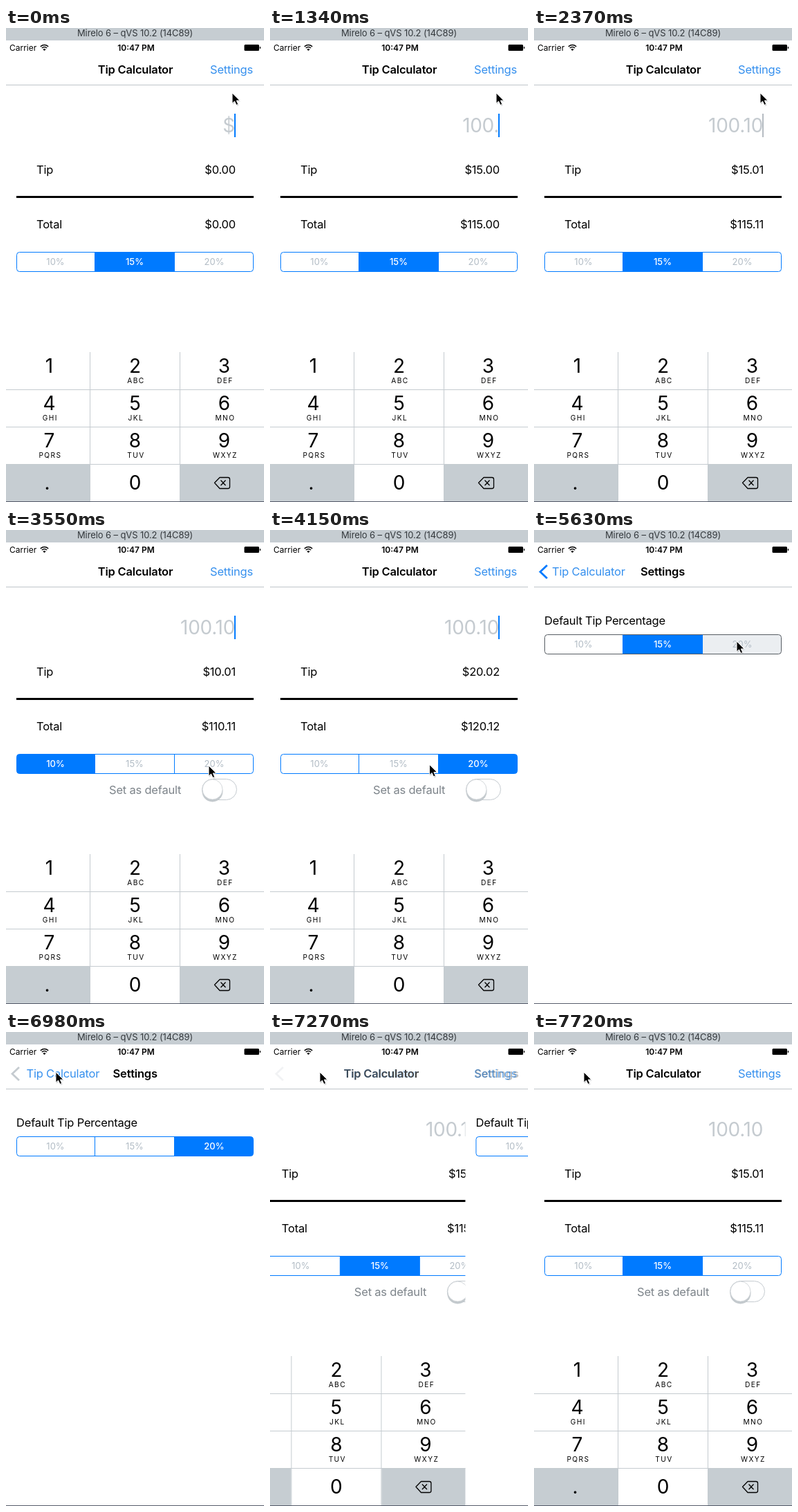
An HTML page that plays this animation: 373x686 px, repeating every 8000 ms.

```html
<!DOCTYPE html>
<html lang="en">
<head>
<meta charset="utf-8">
<title>Tip Calculator</title>
<style>
html, body { margin: 0; width: 100%; height: 100%; overflow: hidden; background: #fff; }
svg { display: block; width: 100vw; height: 100vh; font-family: Inter, Roboto, sans-serif; }
text { white-space: pre; }
</style>
</head>
<body>
<svg id="stage" viewBox="0 0 373 686"></svg>
<script>
const W = 373, LOOP = 8000, STEP = 148.6, FIRST = 280;
const BLUE = '#007aff', LINK = '#3690ee', GREY = '#c5cbd0', BAR = '#c6cdd2';
const stage = document.getElementById('stage');

const clamp = v => Math.max(0, Math.min(1, v));
const ramp = (t, a, b) => clamp((t - a) / (b - a));
const easeOut = v => 1 - (1 - v) ** 2;
const easeBoth = v => v * v * (3 - 2 * v);

// Value of the last entry [time, value] already reached.
const at = (list, t) => list.filter(e => e[0] <= t).pop()[1];

const hold = t => t < FIRST ? 0 : FIRST + Math.floor((t - FIRST) / STEP) * STEP;

const typed = [[0, ''], [270, '1'], [570, '10'], [720, '100'],
  [1310, '100.'], [1460, '100.1'], [1610, '100.10']];
const chosen = [[0, 1], [2940, 0], [3690, 2], [4430, 1]];
const caretTone = [[0, BLUE], [1760, '#b5bcc2'], [2500, 'none'], [2940, BLUE],
  [4430, 'none']];
const path = [[0, 327, 94], [2361, 327, 94], [2807, 75, 338], [3104, 75, 338],
  [3400, 293, 341], [3996, 293, 341], [4293, 167, 338], [4590, 167, 338],
  [4887, 325, 62], [5332, 325, 62], [5480, 293, 161], [6076, 293, 161],
  [6372, 72, 58], [LOOP, 72, 58]];

function pointer(t) {
  const i = Math.max(1, path.findIndex(p => p[0] >= t));
  const [a, x, y] = path[i - 1], [b, u, v] = path[i];
  const k = easeBoth(ramp(t, a, b));
  return [x + (u - x) * k, y + (v - y) * k];
}

function text(s, x, y, o = {}) {
  const { size = 16.5, fill = '#000', anchor = 'start', weight = 400, track = -0.2, alpha = 1 } = o;
  return `<text x="${x}" y="${y}" font-size="${size}" fill="${fill}" text-anchor="${anchor}" ` +
    `font-weight="${weight}" letter-spacing="${track}" opacity="${alpha}">${s}</text>`;
}
const mid = (s, x, y, o) => text(s, x, y, { anchor: 'middle', ...o });
const right = (s, x, y, o) => text(s, x, y, { anchor: 'end', ...o });
const rect = (x, y, w, h, fill, more = '') =>
  `<rect x="${x}" y="${y}" width="${w}" height="${h}" fill="${fill}" ${more}/>`;
const line = (d, stroke, width = 1, more = '') =>
  `<path d="${d}" fill="none" stroke="${stroke}" stroke-width="${width}" ${more}/>`;
const group = (dx, dy, body, alpha = 1) =>
  `<g transform="translate(${dx} ${dy})" opacity="${alpha}">${body}</g>`;

const money = v => '$' + (Math.floor(v * 100 + 1e-6) / 100).toFixed(2);

function segments(y, sel, pressed = -1, edge = BLUE) {
  const xs = [15.5, 128.5, 243.5, 357.5];
  const cell = (i, fill) => {
    const a = xs[i], b = xs[i + 1];
    const l = i === 0 ? 4 : 0, r = i === 2 ? 4 : 0;
    return `<path d="M${a + l} .5H${b - r}q${r} 0 ${r} ${r}V${28.5 - r}q0 ${r} ${-r} ${r}` +
      `H${a + l}q${-l} 0 ${-l} ${-l}V${.5 + l}q0 ${-l} ${l} ${-l}z" fill="${fill}"/>`;
  };
  let s = pressed >= 0 ? cell(pressed, '#ebeef1') : '';
  s += cell(sel, BLUE) + rect(15.5, .5, 342, 28, 'none', `rx="4" stroke="${edge}"`);
  s += line('M128.5 .5v28M243.5 .5v28', BLUE);
  ['10%', '15%', '20%'].forEach((label, i) => {
    const on = i === sel;
    s += mid(label, [71.5, 186, 301][i], 19.2,
      { size: 13, track: 0, fill: on ? '#fff' : '#b2bcc5', weight: on ? 500 : 400 });
  });
  return group(0, y, s);
}

function toggle(alpha) {
  return group(0, 0,
    text('Set as default', 149, 382, { fill: '#7d848a' }) +
    rect(283.5, 360.5, 50, 30, '#fff', `rx="15" stroke="${GREY}"`) +
    '<circle cx="298.5" cy="378.5" r="15" fill="#c3c9cd"/>' +
    '<circle cx="298.5" cy="375.5" r="14.5" fill="#fff" stroke="#c9ced2" stroke-width=".8"/>', alpha);
}

function billView(t) {
  const entry = at(typed, t), sel = at(chosen, t);
  const bill = parseFloat(entry) || 0, tip = bill * [.1, .15, .2][sel];
  const shown = t > 7000 ? 1 : ramp(t, 2950, 3250) * (1 - ramp(t, 4290, 4580));
  return rect(0, 83, W, 603, '#fff') +
    right(entry || '$', 331, 151, { size: 28, fill: GREY, track: -0.3 }) +
    rect(330, 124, 2, 34, at(caretTone, t)) +
    text('Tip', 44, 210.5) + right(money(tip), 332, 210.5) +
    rect(15, 243, 343, 3, '#000') +
    text('Total', 44, 289.5) + right(money(bill + tip), 332, 289.5) +
    segments(324, sel) + toggle(shown);
}

function keypad() {
  const cx = [62.5, 186.5, 315.5];
  const subs = ['', 'ABC', 'DEF', 'GHI', 'JKL', 'MNO', 'PQRS', 'TUV', 'WXYZ'];
  let s = rect(0, 469, W, 217, '#fff') + rect(0, 631, 121, 55, BAR) + rect(252, 631, 121, 55, BAR);
  s += line('M0 523.5H373M0 577.5H373M0 631.5H373M121.5 469V686M251.5 469V686', GREY);
  subs.forEach((sub, i) => {
    const x = cx[i % 3], y = 498.8 + 54 * Math.floor(i / 3);
    s += mid(i + 1, x, y, { size: 28, track: 0 });
    s += mid(sub, x + 1.4, y + 15.2, { size: 10.2, track: 1.4 });
  });
  s += mid('.', 59.5, 667.5, { size: 28, track: 0 }) + mid('0', 186.5, 668, { size: 28, track: 0 });
  return s + line('M309 650.5h12q2.500 0 2.500 2.500v11q0 2.500-2.500 2.500h-12l-7.500-8.200z' +
    'M310.500 654.500l7 7.500M317.500 654.500l-7 7.500', '#000', 1.3, 'stroke-linejoin="round"');
}

function settingsView(t) {
  const saved = t > 5920 ? 2 : 1;
  const down = t > 5620 && t < 5920 ? 2 : -1;
  return rect(0, 83, W, 603, '#fff') + text('Default Tip Percentage', 15, 136.5) +
    segments(151, saved, down, t < 5770 ? '#565c62' : BLUE);
}

function navBar(t, p) {
  const back = t > 6660, nudge = t > 6960 && p === 1;
  const tap = t > 5030 && t < 5180;
  const bold = { weight: 600 };
  return rect(0, 18, W, 64, '#fff') + line('M0 82.5H373', '#bfc5ca') +
    mid('Tip Calculator', 187 - 108 * (1 - (1 - p)), 66, { ...bold, alpha: 1 - p }) +
    right('Settings', 357, 66, { fill: tap ? '#b9d4ee' : LINK, alpha: 1 - p }) +
    line('M19 51L9 60.500L19 70', back ? GREY : BLUE, 2.8, `opacity="${p}"`) +
    text('Tip Calculator', 26 + 106 * (1 - p) + (nudge ? 3.5 : 0), 66, { fill: LINK, alpha: p }) +
    mid('Settings', 186 + 187 * (1 - p) + (nudge ? .7 : 0), 66, { ...bold, alpha: p });
}

function statusBar() {
  return rect(0, 0, W, 18, BAR) +
    mid('Mirelo 6 – qVS 10.2 (14C89)', 186.5, 12, { size: 13, track: -0.1, fill: '#33383c' }) +
    text('Carrier', 5, 32.6, { size: 12, track: 0 }) +
    mid('10:47 PM', 188, 32.6, { size: 12, track: 0, weight: 600 }) +
    line('M49.800 26.800q5.700-4.600 11.400 0M51.800 29q3.700-3 7.400 0', '#000', 1.5) +
    '<path d="M53.400 30.900q2.100-1.600 4.200 0l-2.100 2.200z"/>' +
    rect(344.5, 24, 21.5, 9, '#000', 'rx="1.5"') + rect(366.8, 27, 1.4, 3, '#000', 'rx=".7"');
}

function mouse(t) {
  const [x, y] = pointer(t);
  const shape = 'M0 0V15.200L3.500 12L6 17.500L8.700 16.300L6.300 11H11z';
  return group(x + 1, y + 1.5, `<path d="${shape}" fill="#7f868c" opacity=".35"/>`) +
    group(x, y, `<path d="${shape}" stroke="#fff" stroke-width="1"/>`);
}

function draw(t) {
  const p = easeOut(ramp(t, 5035, 5470)) * (1 - easeOut(ramp(t, 6970, 7550)));
  stage.innerHTML =
    group(-W * .3 * p, 0, billView(t)) +
    (p > 0 ? group(W * (1 - p), 0, settingsView(t)) : '') +
    group(-W * p, 0, keypad()) +
    navBar(t, p) + statusBar() +
    rect(0, 685, W, 1, '#555b6a') + mouse(t);
}

let last = -1;
const start = performance.now();
function tick() {
  const t = hold((performance.now() - start) % LOOP);
  if (t !== last) draw(last = t);
  requestAnimationFrame(tick);
}
tick();
</script>
</body>
</html>
```
